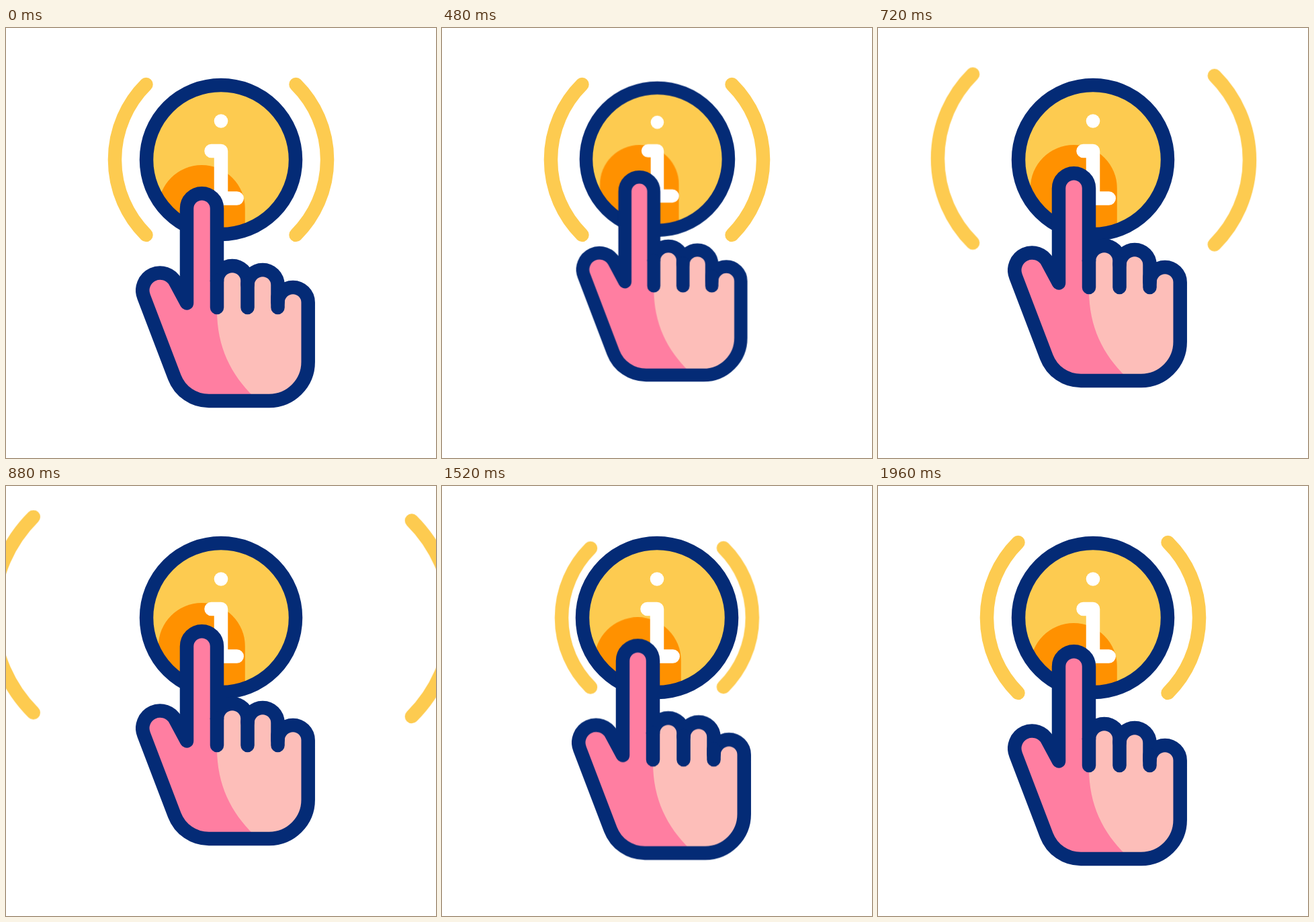
Write an HTML page without scripts that moves like this. It is 640 px wide and 640 px high and loops after 2000 ms.

```html
<!DOCTYPE html>
<html lang="en">
<head>
<meta charset="utf-8">
<title>Tap for info</title>
<style>
  html, body { margin: 0; width: 100%; height: 100%; overflow: hidden; background: #fff; }
  svg { display: block; width: 100vw; height: 100vh; }

  .line { fill: none; stroke-width: 20.5; stroke-linecap: round; stroke-linejoin: round; }
  .navy { stroke: #042b76; }
  .gold { stroke: #fdcb50; vector-effect: non-scaling-stroke; }
  .white { stroke: #fff; }

  .lift, .press, .wave {
    animation: 2s cubic-bezier(.333, 0, .667, 1) infinite;
  }
  .lift { animation-name: lift; }
  .press { animation-name: press; }
  .left { animation-name: left; }
  .right { animation-name: right; }

  .disc { transform-origin: 328px 177px; }
  .halo { transform-origin: 310px 176px; }
  .palm { transform-origin: 340px 369px; }

  @keyframes lift {
    0%, 98%, 100% { transform: translateY(0); }
    20% { transform: translateY(-30px); }
    50% { transform: translateY(-30px); animation-timing-function: cubic-bezier(.47, 0, .36, 1); }
  }
  @keyframes press {
    0%, 20%, 30%, 100% { transform: scale(1); }
    25% { transform: scale(.95); }
  }
  /* waves fly out, then grow back from behind the button */
  @keyframes left {
    0%, 26%, 98%, 100% { transform: translate(0, 0) scale(1); }
    56% { transform: translate(-354.3px, -97.3px) scale(1.462); }
    56.01% { transform: translate(97.8px, 51.8px) scale(.736); animation-timing-function: cubic-bezier(0, 0, .48, 1); }
  }
  @keyframes right {
    0%, 26%, 98%, 100% { transform: translate(0, 0) scale(1); }
    56% { transform: translate(64.8px, -89px) scale(1.464); }
    56.01% { transform: translate(71.1px, 50.8px) scale(.736); animation-timing-function: cubic-bezier(0, 0, .48, 1); }
  }
</style>
</head>
<body>
<svg viewBox="0 0 640 640">
  <defs>
    <path id="hand" d="M269 409.5V268.7A22.5 22.5 0 0 1 314 268.7V376.7A22.75 22.75 0 0 1 359.5 376.7V382.5A22.5 22.5 0 0 1 404.5 382.5V408.5A22.6 22.6 0 0 1 449.7 408.5V497A58 58 0 0 1 391.7 555H302A54.8 54.8 0 0 1 250.8 519.8L205.2 400.3A26 26 0 0 1 252.4 378.6Z"/>
    <clipPath id="handClip"><use href="#hand"/></clipPath>
    <clipPath id="discClip"><circle cx="320" cy="196" r="105"/></clipPath>
  </defs>

  <path class="line gold wave left" d="M208.5 84A158 158 0 0 0 208.5 308"/>
  <path class="line gold wave right" d="M431.5 84A158 158 0 0 1 431.5 308"/>

  <g class="press disc">
    <circle cx="320" cy="196" r="111" fill="#fdcb50"/>
    <g clip-path="url(#discClip)">
      <g class="press halo">
        <path class="lift" fill="#ff9100" d="M226.8 420V268.5A64.5 64.5 0 0 1 355.8 268.5V420Z"/>
      </g>
    </g>
    <circle class="line navy" cx="320" cy="196" r="111"/>
    <circle cx="320" cy="138.5" r="10.3" fill="#fff"/>
    <path class="line white" d="M305.5 183H320V253.5H343.7"/>
  </g>

  <g class="lift">
    <g class="press palm">
      <use href="#hand" fill="#ff7ea1"/>
      <g clip-path="url(#handClip)">
        <path fill="#fdbeb9" d="M314 340V420C314 475 335 516 369 549V560H470V340Z"/>
      </g>
      <use href="#hand" class="line navy"/>
      <path class="line navy" d="M314 376V416M359.5 380V416M404.5 400V416"/>
    </g>
  </g>
</svg>
</body>
</html>
```
